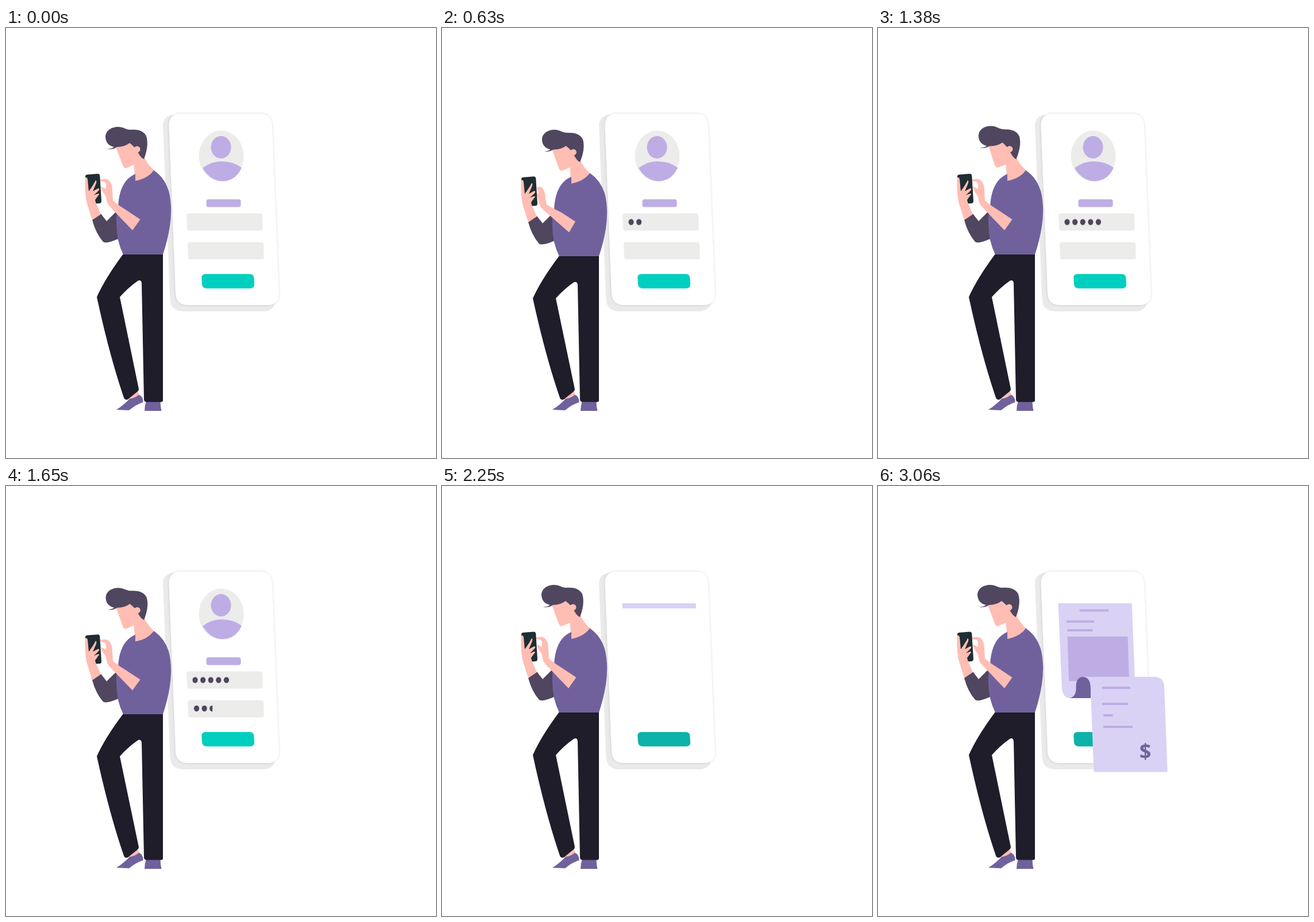
Animation, 748 px wide and 748 px high, one loop 3.6 s. Source, as an HTML page:

```html
<!DOCTYPE html>
<html lang="en">
<head>
<meta charset="utf-8">
<title>Mobile payment</title>
<style>
  html, body { margin: 0; width: 100%; height: 100%; overflow: hidden; background: #fff; }
  svg { display: block; width: 100vw; height: 100vh; }
  .skin { fill: #ffbdb3; }
  .hair { fill: #50465f; }
  .shirt { fill: #70619d; }
  .lilac { fill: #beade5; }
  .paper { fill: #d9d2f4; }
  .field { fill: #ececeb; }
  .rule { stroke: #beade5; stroke-width: 4; }
  text { font: 700 36px "Open Sans", "Noto Sans", sans-serif; text-anchor: middle; }
</style>
</head>
<body>
<svg viewBox="0 0 748 748">
  <defs>
    <filter id="shade" x="-10%" y="-10%" width="120%" height="120%">
      <feDropShadow dx="0" dy="0" stdDeviation="2" flood-color="#000" flood-opacity=".16"/>
    </filter>
    <clipPath id="userClip"><rect id="userMask" x="320" y="325" height="25"/></clipPath>
    <clipPath id="passClip"><rect id="passMask" x="320" y="375" height="25"/></clipPath>
    <clipPath id="billClip"><rect id="billMask" x="300" y="200" width="220"/></clipPath>
  </defs>

  <!-- Phone card -->
  <path fill="#eaeaea" d="M273 169Q274 153 291 151H443L468 476Q467 491 449 493H308Q287 492 285.500 473Z"/>
  <path fill="#fff" filter="url(#shade)" d="M283.500 169Q283.500 150 303 149H443Q461 150 462.500 168L474.500 463Q474 481 456 482H316Q296 481 295 462Z"/>
  <path id="button" d="M347 428H424Q431 428 431.300 435L432 446Q432 453 425 453H349Q342 453 341 446L340.300 435Q340 428 347 428Z"/>

  <g id="form">
    <ellipse class="field" cx="374.500" cy="222.500" rx="39" ry="44"/>
    <ellipse class="lilac" cx="374" cy="207.500" rx="17.500" ry="19.500"/>
    <path class="lilac" d="M342 243.500Q357 232 375 232Q395 232 410 243Q400 266 377 266.500Q355 266 342 243.500Z"/>
    <rect class="lilac" x="348.500" y="298" width="60" height="13.500" rx="4"/>
    <path id="slot" class="field" d="M318 322.500H442Q446 322.500 446 326.500L446.700 348.500Q446.700 352.500 442.700 352.500H319Q315 352.500 315 348.500L314 326.500Q314 322.500 318 322.500Z"/>
    <use href="#slot" x="2" y="50"/>
    <g id="user" class="hair" clip-path="url(#userClip)"></g>
    <g id="pass" class="hair" clip-path="url(#passClip)"></g>
  </g>

  <!-- Receipt -->
  <g clip-path="url(#billClip)">
    <path class="paper" d="M313.500 204H441.500L447 340H345V355Q343 369 333 369Q321 368 319.800 350Z"/>
    <path class="lilac" d="M329.500 262H434.500L437 339.500H332Z"/>
    <path class="rule" d="M350.500 216.500H401M328 235.800H376M329.500 251H373.500"/>
    <path class="shirt" d="M333 369Q344 367 344.500 353V346Q346 332 357 332Q369 333 370 346V369Z"/>
    <path class="paper" d="M357 332H482Q497 333 498 349L503.500 497.500H375.500L369.700 350Q369 333 357 332Z"/>
    <path class="rule" d="M390 351H438.500M390 379H435M392 399H408.500M392 419H443"/>
    <text class="shirt" x="465" y="474">$</text>
  </g>

  <!-- Man -->
  <path class="skin" d="M212 646L229 632L233 640L219 648Z"/>
  <path class="shirt" d="M192 664Q205 656 215 645Q224 644 231 638Q239 641 238.500 651Q226 655 214 665Z"/>
  <path class="shirt" d="M244 649H269Q268 656 270.500 666H241Q241 657 244 649Z"/>
  <g id="body">
    <path fill="#1f1d2a" d="M204 393H273V647.500Q273 650.500 270 650.500H244Q240 650 240 646L236 444Q235 437 229 440Q212 452 198 468L231 628Q231 631 228 633L212 646Q207 648 205 643Q180 570 158 468Q172 436 204 393Z"/>
    <path class="hair" d="M194 317L175 336L165 323L150 334Q156 357 169 372Q175 376 197 366Z"/>
    <path class="skin" d="M222 232L225 267Q246 264 259 249Q247 239 239 222Z"/>
    <path class="shirt" d="M225 254V266Q247 262 257 247.500Q275 259 283 283Q290 310 285 345Q281 370 273 394H204Q192 370 192 340Q191 322 195 312Q196 283 208 267Q215 258 225 254Z"/>
    <path fill="#1f2d33" d="M141 255L160 253.500Q163 254 163.300 257L166 301Q166 304.500 163 305L146 306L138 258Q138 255.500 141 255Z"/>
    <path class="skin" d="M138 261Q141 258 142 263L144 284Q152 273 156 265Q158 265 157 270L151 284L160 279Q164 279 161 283L153 291L160 288Q164 288 160 292L155 299Q156 304 158 308L165 324L150 334L140 302Q136 280 138 261Z"/>
    <path id="hand" class="skin"/>
    <g id="head">
      <path class="skin" d="M191 207L203 239Q206 246 211 243L222 238L238 226L232 200L214 196Z"/>
      <path class="hair" d="M240 228Q235 226 231 219L224 208Q220 204 215 200Q206 207 193 207Q186 212 176 210.500Q184 210 188 207Q174 204 173 190C173 178 184 172 195 172C204 172 209 177 216 177C228 176 239 178 244 188C248 200 245 215 240 228Z"/>
      <circle class="skin" cx="228" cy="211" r="5.500"/>
    </g>
  </g>
</svg>
<script>
const LOOP = 3600, STEP = 30;
const $ = id => document.getElementById(id);
const linear = u => u;
const smooth = u => (1 - Math.cos(Math.PI * u)) / 2;

// Value at time t along [time, value] keys
function track(t, keys, ease = linear) {
  if (t <= keys[0][0]) return keys[0][1];
  for (let i = 1; i < keys.length; i++) {
    const [a, from] = keys[i - 1], [b, to] = keys[i];
    if (t < b) return from + (to - from) * ease((t - a) / (b - a));
  }
  return keys[keys.length - 1][1];
}

const bob = [[300, 0], [630, 1], [960, 0], [1380, 0], [1680, 1], [2040, 0]];
const nod = [[90, 0], [330, 3.6], [630, 1.2], [1140, 3.6], [1380, 2.3], [1800, 0]];
const userType = [[470, 324], [880, 389]];
const passType = [[1446, 327], [2042, 421]];
const unroll = [[2220, 204], [2250, 213], [2610, 342], [2760, 399], [3060, 498]];

const raised = "M164 264Q172 261 178 264Q185 270 185 282L186 300Q192 306 208 316L233.500 333L220 352L180 310Q175 305 174 293Q166 282 165 276Q169 277 173 280Q176 273 172 268L164 266Z";
const pressed = "M165 273Q172 270 175 274Q180 282 180 292L182 303Q192 309 208 317L232 333L221 352L176 312Q168 304 168 296Q166 286 165 284Q166 283 168 284Q168 280 167 278L165 275Z";
const number = /[\d.]+/g, pressedAt = pressed.match(number);

function handPath(u) {
  let i = 0;
  return raised.replace(number, n => +n + (pressedAt[i++] - n) * u);
}

// Finger taps at a steady beat while the form is filled in
function tap(t) {
  const beat = Math.round((t - 200) / 430);
  if (beat < 0 || beat > 5) return 0;
  return smooth(Math.max(0, 1 - Math.abs(t - 200 - beat * 430) / 100));
}

function addDots(id, count, x, y) {
  for (let i = 0; i < count; i++)
    $(id).innerHTML += `<ellipse cx="${x + i * 13.6}" cy="${y}" rx="4.6" ry="5.2"/>`;
}
addDots("user", 5, 329, 337.5);
addDots("pass", 7, 331.5, 387);

function draw(now) {
  const t = Math.floor(now % LOOP / STEP) * STEP;
  const squash = 1 - 0.012 * track(t, bob, smooth);
  $("body").setAttribute("transform", `translate(0 ${654 * (1 - squash)}) scale(1 ${squash})`);
  $("head").setAttribute("transform", `rotate(${track(t, nod, smooth)} 235 235)`);
  $("hand").setAttribute("d", handPath(tap(t)));
  $("userMask").setAttribute("width", track(t, userType) - 320);
  $("passMask").setAttribute("width", track(t, passType) - 320);
  $("billMask").setAttribute("height", t < 2250 ? 0 : track(t, unroll) - 200);
  $("form").style.display = t < 2220 ? "" : "none";
  const press = track(t, [[2100, 0], [2190, 1]]);
  $("button").style.fill = `rgb(${13 * press}, ${207 - 29 * press}, ${191 - 22 * press})`;
  requestAnimationFrame(() => draw(performance.now() - start));
}
const start = performance.now();
draw(0);
</script>
</body>
</html>
```
